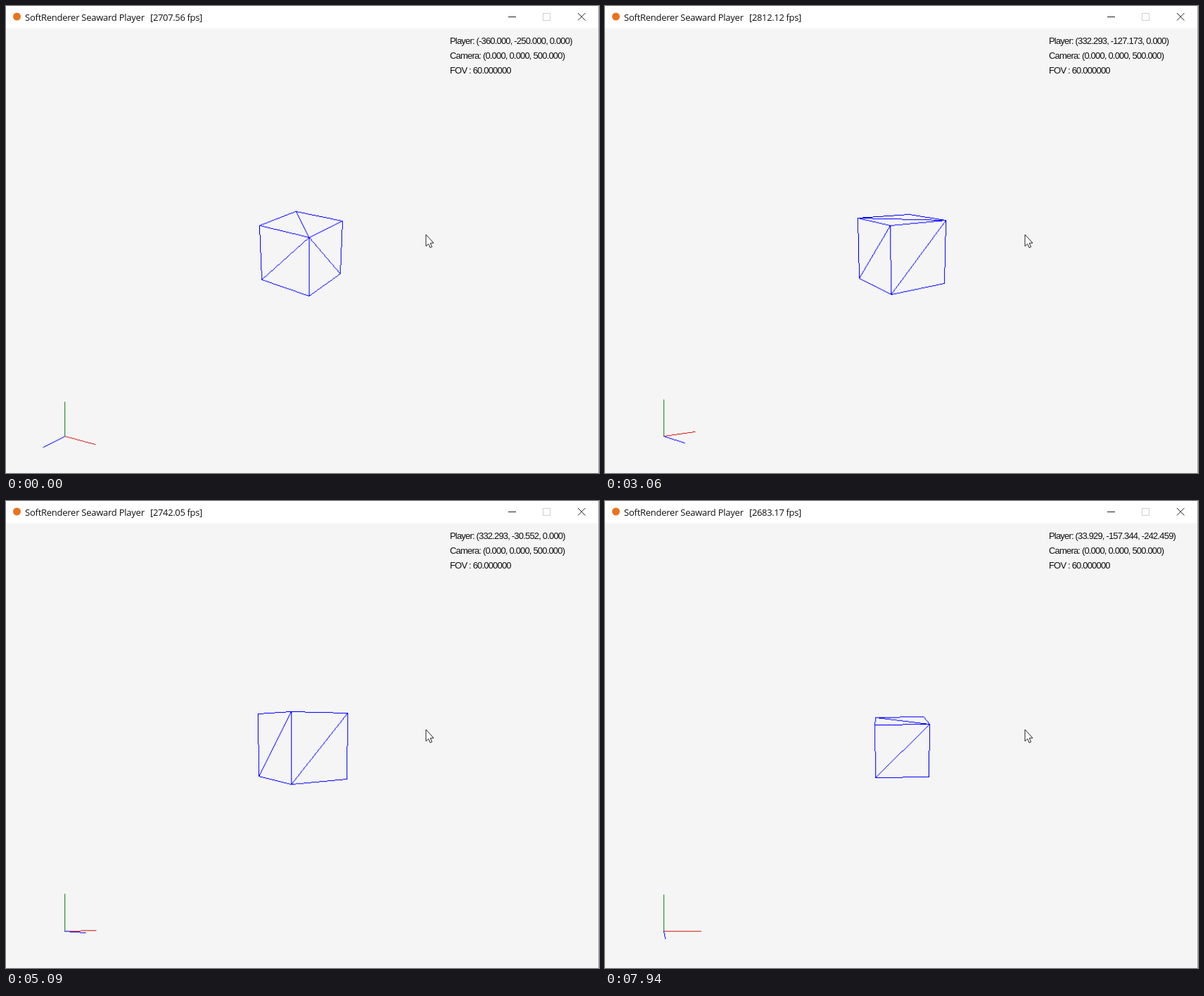
Recreate the animation shown at these times as an HTML page with a canvas. Size 843x664 px, loop 8 s.

```html
<!DOCTYPE html>
<html lang="en">
<head>
<meta charset="utf-8">
<title>Soft renderer player</title>
<style>
  html, body { margin: 0; width: 100%; height: 100%; overflow: hidden; background: #f5f5f5; }
  canvas { display: block; width: 843px; height: 664px; }
</style>
</head>
<body>
<canvas id="stage" width="843" height="664"></canvas>
<script>
const ctx = document.getElementById('stage').getContext('2d');

// The scene is plotted pixel by pixel at 800 x 600, then enlarged into the window.
const layer = document.createElement('canvas');
layer.width = 800;
layer.height = 600;
const pix = layer.getContext('2d');

const LOOP = 8000;
const STEP = 70;
const BURSTS = [330, 4320, 5290, 7240];

// Held keys move the player along one axis at a constant speed.
const SPEED = 0.5;
const START = [-360, -250, 0];
const HOLDS = [
  { axis: 0, dir: -1, from: 300, to: 851.49 },
  { axis: 0, dir: 1, from: 851.49, to: 2787.567 },
  { axis: 1, dir: 1, from: 2814.346, to: 4072.346 },
  { axis: 1, dir: -1, from: 4270.896, to: 5138.06 },
  { axis: 2, dir: -1, from: 5240, to: 5324.518 },
  { axis: 2, dir: 1, from: 5324.518, to: 5971.252 },
  { axis: 2, dir: -1, from: 5971.252, to: 7018.386 },
  { axis: 0, dir: -1, from: 7210, to: 7806.728 },
  { axis: 1, dir: -1, from: 7734.476, to: 7940 }
];

const CAMERA = [0, 0, 500];
const FOCAL = 300 / Math.tan(Math.PI / 6);
const HALF = 50;
const GIZMO = { x: -320, y: -250, size: 50 };
const AXIS_COLORS = ['#d01810', '#148010', '#0000ff'];

const dot = (a, b) => a[0] * b[0] + a[1] * b[1] + a[2] * b[2];
const sub = (a, b) => a.map((v, i) => v - b[i]);

// Time moves in steps counted from the start of each burst of motion.
function quantize(t) {
  const start = BURSTS.filter(b => b <= t).pop() || 0;
  return start + Math.floor((t - start) / STEP) * STEP;
}

function playerAt(t) {
  const pos = [...START];
  for (const { axis, dir, from, to } of HOLDS) {
    pos[axis] += dir * SPEED * Math.max(0, Math.min(t, to) - from);
  }
  return pos;
}

function fpsAt(t) {
  const slot = Math.floor((t + 290) / 420);
  const noise = Math.abs(Math.sin(slot * 12.9898 + 1) * 43758.5453) % 1;
  return 2500 + noise * 380;
}

// Camera basis looking at the player with +y up.
function lookAt(target) {
  const d = sub(target, CAMERA);
  const flat = Math.hypot(d[0], d[2]);
  const dist = Math.hypot(...d);
  const hx = d[0] / flat, hz = d[2] / flat;
  const sin = -d[1] / dist, cos = flat / dist;
  return {
    right: [-hz, 0, hx],
    up: [hx * sin, cos, hz * sin],
    forward: [hx * cos, -sin, hz * cos]
  };
}

const toPixel = (x, y) => [Math.floor(399.5 + x), Math.floor(300.5 - y)];

// Hard-edged line on the pixel layer.
function plot(color, [x0, y0], [x1, y1]) {
  const n = Math.max(Math.abs(x1 - x0), Math.abs(y1 - y0), 1);
  pix.fillStyle = color;
  for (let i = 0; i <= n; i++) {
    pix.fillRect(Math.round(x0 + (x1 - x0) * i / n), Math.round(y0 + (y1 - y0) * i / n), 1, 1);
  }
}

// The diagonal of every face joins the corners whose two free signs agree.
function cubeFaces() {
  const faces = [];
  for (let axis = 0; axis < 3; axis++) {
    for (const side of [1, -1]) {
      const corner = (u, v) => {
        const c = [];
        c[axis] = side;
        c[(axis + 1) % 3] = u;
        c[(axis + 2) % 3] = v;
        return c;
      };
      faces.push({ axis, side, quad: [corner(1, 1), corner(1, -1), corner(-1, -1), corner(-1, 1)] });
    }
  }
  return faces;
}
const FACES = cubeFaces();

function drawCube(player, view) {
  const offset = sub(player, CAMERA);
  const project = corner => {
    const rel = offset.map((v, i) => v + corner[i] * HALF);
    const scale = FOCAL / dot(rel, view.forward);
    return toPixel(dot(rel, view.right) * scale, dot(rel, view.up) * scale);
  };
  for (const { axis, side, quad } of FACES) {
    if (-offset[axis] * side <= HALF) continue;
    const p = quad.map(project);
    p.forEach((a, i) => plot('#0000ff', a, p[(i + 1) % 4]));
    plot('#0000ff', p[0], p[2]);
  }
}

function drawGizmo(view) {
  const { x, y, size } = GIZMO;
  AXIS_COLORS.forEach((color, i) => plot(color, toPixel(x, y),
    toPixel(x + view.right[i] * size, y + view.up[i] * size)));
}

function line(color, x0, y0, x1, y1) {
  ctx.strokeStyle = color;
  ctx.beginPath();
  ctx.moveTo(x0, y0);
  ctx.lineTo(x1, y1);
  ctx.stroke();
}

function text(str, x, y, font, spacing) {
  ctx.font = font;
  ctx.letterSpacing = spacing;
  ctx.fillStyle = '#111';
  ctx.fillText(str, x, y);
}

function drawWindow(t) {
  ctx.fillStyle = '#f5f5f5';
  ctx.fillRect(0, 0, 843, 664);
  ctx.fillStyle = '#fff';
  ctx.fillRect(0, 0, 843, 31.5);
  ctx.fillStyle = '#a6a6a6';
  ctx.fillRect(842, 0, 1, 664);

  ctx.fillStyle = '#e8741e';
  ctx.beginPath();
  ctx.arc(15.5, 15, 5.5, 0, Math.PI * 2);
  ctx.fill();

  const font = '13px "Open Sans", "Noto Sans", sans-serif';
  text('SoftRenderer Seaward Player', 27, 21, font, '-0.25px');
  text(`[${fpsAt(t).toFixed(2)} fps]`, 205, 21, font, '-0.36px');

  ctx.lineWidth = 1;
  line('#222', 714, 15.5, 725, 15.5);
  ctx.strokeStyle = '#cfcfcf';
  ctx.strokeRect(763.5, 10.5, 10, 10);
  line('#222', 813, 10, 823.5, 20.5);
  line('#222', 823.5, 10, 813, 20.5);
}

function drawStats(player) {
  const triple = v => `(${v.map(n => n.toFixed(3)).join(', ')})`;
  const rows = [`Player: ${triple(player)}`, `Camera: ${triple(CAMERA)}`, 'FOV : 60.000000'];
  rows.forEach((row, i) => text(row, 631, 54 + i * 21,
    '13px "Liberation Sans", Arial, sans-serif', '-0.82px'));
}

function drawCursor() {
  const arrow = new Path2D('M597 325v16.5l3.6-3.3 2.4 5.4 2.6-1.1-2.4-5.3 4.8-.2z');
  ctx.fillStyle = '#fff';
  ctx.fill(arrow);
  ctx.strokeStyle = '#222';
  ctx.stroke(arrow);
}

function draw(time) {
  const t = quantize(time);
  const player = playerAt(t);
  const view = lookAt(player);
  drawWindow(t);
  pix.clearRect(0, 0, 800, 600);
  drawGizmo(view);
  drawCube(player, view);
  ctx.drawImage(layer, 0, 31, 842, 633);
  drawStats(player);
  drawCursor();
}

const began = performance.now();
function tick() {
  draw((performance.now() - began) % LOOP);
  requestAnimationFrame(tick);
}
tick();
</script>
</body>
</html>
```
